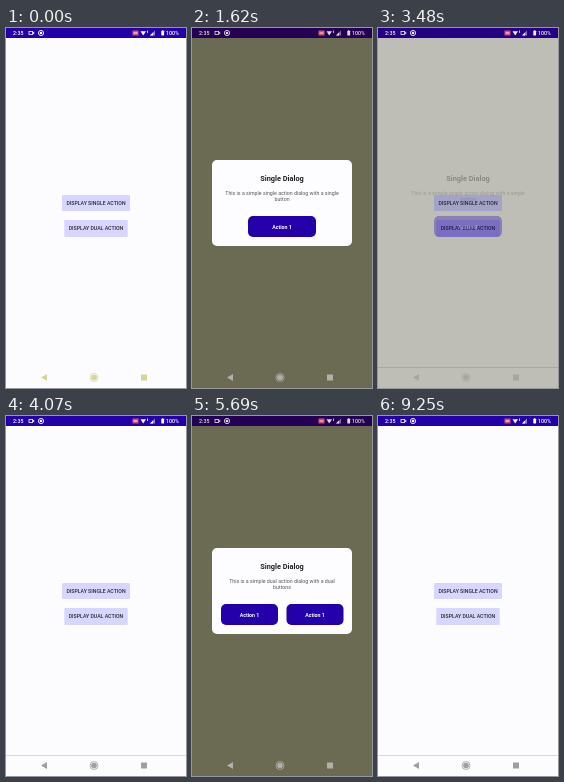
An HTML page with a canvas for the animation above (9350 ms loop, 180 by 360 pixels).

```html
<!DOCTYPE html>
<html>
<head>
<meta charset="utf-8">
<style>
html, body { margin: 0; width: 100%; height: 100%; overflow: hidden; background: #fcfcff; }
canvas { display: block; width: 180px; height: 360px; }
</style>
</head>
<body>
<canvas id="stage"></canvas>
<script>
const LOOP = 9350;
const canvas = document.getElementById('stage');
const ratio = window.devicePixelRatio || 1;
canvas.width = 180 * ratio;
canvas.height = 360 * ratio;
const ctx = canvas.getContext('2d');

const clamp = v => Math.max(0, Math.min(1, v));
const ramp = (t, from, to) => clamp((t - from) / (to - from));
const easeOut = p => 1 - (1 - p) * (1 - p);
const mix = (a, b, p) => `rgb(${a.map((v, i) => Math.round(v + (b[i] - v) * p))})`;

function box(x, y, w, h, color, radius = 0) {
  ctx.fillStyle = color;
  ctx.beginPath();
  ctx.roundRect(x, y, w, h, radius);
  ctx.fill();
}

function disc(x, y, r, color) {
  ctx.fillStyle = color;
  ctx.beginPath();
  ctx.arc(x, y, r, 0, Math.PI * 2);
  ctx.fill();
}

function ring(x, y, r, color, width) {
  ctx.strokeStyle = color;
  ctx.lineWidth = width;
  ctx.beginPath();
  ctx.arc(x, y, r, 0, Math.PI * 2);
  ctx.stroke();
}

function shape(points, color) {
  ctx.fillStyle = color;
  ctx.beginPath();
  points.forEach(([x, y]) => ctx.lineTo(x, y));
  ctx.fill();
}

function label(text, x, y, size, weight, color, align = 'center') {
  ctx.font = `${weight} ${size}px Roboto, sans-serif`;
  ctx.textAlign = align;
  ctx.fillStyle = color;
  ctx.fillText(text, x, y);
}

function statusBar(dim) {
  box(0, 0, 180, 10, mix([36, 0, 170], [36, 0, 85], dim));
  const ink = mix([255, 255, 255], [222, 222, 228], dim);
  label('2:35', 7, 7, 5.3, 500, ink, 'left');
  ctx.strokeStyle = ink;
  ctx.lineWidth = 0.8;
  ctx.strokeRect(23, 3.5, 3.6, 3);
  shape([[26.6, 5], [28.2, 3.6], [28.2, 6.4]], ink);
  ring(35, 5, 2.6, ink, 0.9);
  disc(35, 5, 1.3, ink);
  box(126.5, 2.5, 6, 5, '#d84a68');
  box(127.5, 4.5, 4, 1, ink);
  shape([[134.5, 3.3], [140, 3.3], [137.2, 7.4]], ink);
  box(141, 2.5, 0.8, 2.5, ink);
  shape([[144, 7.4], [149, 7.4], [149, 2.5]], mix([150, 135, 220], [125, 110, 155], dim));
  shape([[144, 7.4], [147, 7.4], [147, 4.5]], ink);
  box(155.3, 2.8, 2.8, 4.7, ink, 0.4);
  box(156.1, 2.2, 1.2, 0.8, ink);
  label('100%', 160, 7, 5.3, 500, ink, 'left');
}

function navBar(dim, settled) {
  const tone = mix([214, 212, 158], [158, 158, 158], settled);
  const icon = dim > 0 ? mix([158, 158, 158], [176, 176, 172], dim) : tone;
  ctx.globalAlpha = settled * (1 - dim ** 4);
  box(0, 339, 180, 1, mix([216, 216, 216], [105, 105, 88], dim));
  ctx.globalAlpha = 1;
  shape([[35, 349.5], [41, 346], [41, 353]], icon);
  ring(88, 349.5, 4, icon, 0.8);
  disc(88, 349.5, 2.8, icon);
  box(135, 346.5, 6, 6, icon);
}

function ripple(x, y, w, h, amount) {
  if (amount <= 0) return;
  ctx.save();
  ctx.beginPath();
  ctx.rect(x, y, w, h);
  ctx.clip();
  disc(x + w / 2, y + h / 2, w * 0.6 * amount, 'rgba(70,60,150,.12)');
  ctx.restore();
}

function mainButton(text, x, y, w, h, dim, press) {
  box(x, y, w, h, mix([214, 214, 255], [96, 96, 130], dim), 0.8);
  ripple(x, y, w, h, press);
  label(text, 90, y + 9.9, 5.2, 500, mix([42, 42, 48], [36, 36, 40], dim));
}

function actionButton(x, w) {
  box(x, 188, w, 21, '#2400aa', 5);
  label('Action 1', x + w / 2, 200.6, 5.25, 700, '#fff');
}

function dialog({ dual, panel, content, scale, press }) {
  if (content <= 0) return;
  ctx.save();
  ctx.translate(90, 175);
  ctx.scale(scale, scale);
  ctx.translate(-90, -175);
  ctx.globalAlpha = panel;
  box(20, 132, 140, 86, '#fdfdff', 5);
  ctx.globalAlpha = content;
  label('Single Dialog', 90, 152.6, 7.35, 700, '#222226');
  const kind = dual ? 'dual' : 'single';
  const ending = dual ? 'a dual' : 'a single';
  label(`This is a simple ${kind} action dialog with ${ending}`, 90, 167.2, 5.25, 400, '#55555c');
  label(dual ? 'buttons' : 'button', 90, 173.4, 5.25, 400, '#55555c');
  if (dual) {
    actionButton(29, 57);
    actionButton(94.5, 57);
    ctx.globalAlpha = content * press * 0.15;
    box(97, 207.6, 52, 1, '#fff');
  } else {
    actionButton(56, 68);
  }
  ctx.restore();
}

function dialogState(t, dual) {
  const [openAt, openEnd, closeAt, closeEnd] = dual
    ? [5370, 5690, 8980, 9250]
    : [1300, 1620, 3270, 3640];
  const opened = ramp(t, openAt, openEnd);
  const closed = ramp(t, closeAt, closeEnd);
  const shown = easeOut(ramp(opened, 0, 0.7));
  return {
    dual,
    dim: opened * (1 - closed),
    panel: shown * (1 - ramp(closed, 0, 0.55)),
    content: shown * (1 - ramp(closed, 0, 0.85)),
    scale: 0.9 + 0.1 * easeOut(opened),
    press: ramp(t, 8690, 8830)
  };
}

function draw(t) {
  const state = dialogState(t, t > 4500);
  const { dim } = state;
  ctx.setTransform(ratio, 0, 0, ratio, 0, 0);
  box(0, 0, 180, 360, mix([252, 252, 255], [107, 107, 84], dim));
  const pressOne = ramp(t, 1040, 1300) * (1 - ramp(t, 1500, 1620));
  const pressTwo = ramp(t, 4990, 5250) * (1 - ramp(t, 5550, 5690));
  mainButton('DISPLAY SINGLE ACTION', 56, 167, 68, 16, dim, pressOne);
  mainButton('DISPLAY DUAL ACTION', 58.3, 192, 63.4, 17, dim, pressTwo);
  navBar(dim, ramp(t, 0, 300));
  dialog(state);
  statusBar(dim);
}

function tick(now) {
  draw(now % LOOP);
  requestAnimationFrame(tick);
}

draw(0);
requestAnimationFrame(tick);
</script>
</body>
</html>
```
